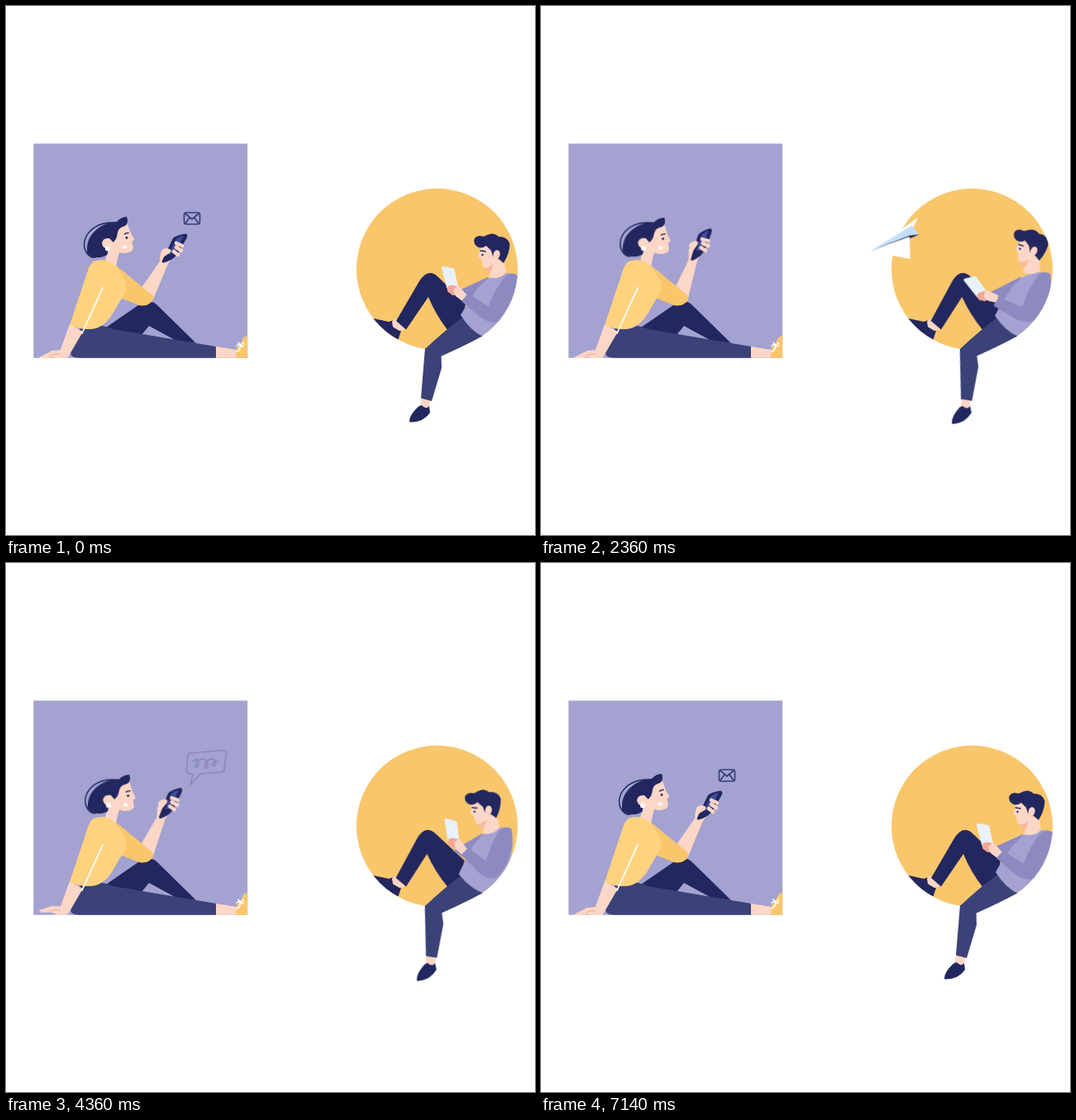
Recreate the animation shown at these times as an HTML page. Size 640 px wide and 640 px high, loop 7210 ms.

```html
<!DOCTYPE html>
<html lang="en">
<head>
<meta charset="utf-8">
<title>Paper plane messages</title>
<style>
  html, body { margin: 0; width: 100%; height: 100%; overflow: hidden; background: #fff; }
  svg { display: block; width: 100%; height: 100%; }

  .navy { fill: #23275f; }
  .denim { fill: #3a4277; }
  .skin { fill: #fcd6c6; }
  .lilac { fill: #a3a2d1; }
  .violet { fill: #8d8ac2; }
  .amber { fill: #f9c66c; }
  .lemon { fill: #ffd280; }
  .white { fill: #fff; }
  .line { fill: none; stroke: #23275f; stroke-width: 1.5; stroke-linecap: round; stroke-linejoin: round; }
  .icon { stroke: #3a3f7c; stroke-width: 1.7; }

  /* The woman and her messages use the full loop, the man and the plane repeat twice in it. */
  .slow { animation: 7.21s ease-in-out infinite; }
  .fast { animation: 3.605s ease-in-out infinite; }

  #w-head { transform-origin: 128px 308px; animation-name: w-head; }
  #w-arm { transform-origin: 170px 355px; animation-name: w-arm; }
  #w-thumb { transform-origin: 187px 300px; animation-name: w-thumb; }
  #w-hand { transform-origin: 70px 419px; animation-name: w-hand; }
  #mail { transform-origin: 225px 257px; animation-name: mail; }
  #bubble { transform-origin: 224px 267px; animation-name: bubble; }

  #m-torso { transform-origin: 572px 396px; animation-name: m-torso; }
  #m-head { transform-origin: 592px 318px; animation-name: m-head; }
  #m-arm { transform-origin: 585px 377px; animation-name: m-arm; }
  #m-hand { transform-origin: 541px 344px; animation-name: m-hand; }
  #m-knee { transform-origin: 480px 390px; animation-name: m-knee; }
  #m-shin { transform-origin: 515px 417px; animation-name: m-shin; }

  #plane {
    offset-path: path("M525 325 C480 325 440 318 405 298 C340 262 340 169.500 400 169.500 C500 167.500 510 245 430 281 C340 320 265 280 224 190");
    offset-rotate: auto;
    offset-anchor: 0 0;
    animation-name: fly;
    animation-timing-function: linear;
  }
  #plane-size { animation-name: plane-size; }

  @keyframes w-head {
    0%, 5% { transform: rotate(0deg); }
    16%, 61% { transform: rotate(3.6deg); }
    74%, 100% { transform: rotate(0deg); }
  }
  @keyframes w-arm {
    0%, 20% { transform: rotate(0deg); }
    30%, 57% { transform: rotate(-9deg); }
    64%, 100% { transform: rotate(0deg); }
  }
  @keyframes w-thumb {
    0%, 8% { transform: none; }
    14%, 78% { transform: translate(2px, -4px) rotate(-12deg); }
    90%, 100% { transform: none; }
  }
  @keyframes w-hand {
    0%, 6% { transform: rotate(0deg); }
    20% { transform: rotate(6deg); }
    32.7% { transform: rotate(0deg); }
    42.6%, 76% { transform: rotate(9deg); }
    98%, 100% { transform: rotate(0deg); }
  }
  @keyframes mail {
    0%, 7% { opacity: 1; transform: none; }
    11.5% { opacity: 0; transform: none; }
    91% { opacity: 0; transform: scale(0); }
    94.5% { opacity: 1; transform: scale(1.1); }
    97%, 100% { opacity: 1; transform: none; }
  }
  @keyframes bubble {
    0%, 44% { opacity: 0; transform: scale(0); }
    47% { opacity: 1; transform: scale(1.08); }
    49%, 57% { opacity: 1; transform: none; }
    62.3%, 100% { opacity: 0; transform: none; }
  }

  @keyframes m-torso {
    0%, 2% { transform: rotate(0deg); }
    20%, 28% { transform: rotate(-6deg); }
    39.7% { transform: rotate(-3.6deg); }
    51%, 67% { transform: rotate(-2.2deg); }
    92%, 100% { transform: rotate(0deg); }
  }
  @keyframes m-head {
    0%, 2% { transform: rotate(0deg); }
    20%, 28% { transform: rotate(1deg); }
    39.7% { transform: translate(0, -1px) rotate(-.5deg); }
    51%, 67% { transform: translate(3px, -4px) rotate(12deg); }
    85.2% { transform: rotate(1deg); }
    92%, 100% { transform: rotate(0deg); }
  }
  @keyframes m-arm {
    0%, 2% { transform: rotate(0deg); }
    20%, 28% { transform: rotate(11deg); }
    39.7% { transform: rotate(1.5deg); }
    51%, 67% { transform: rotate(-7.5deg); }
    85.2% { transform: rotate(-1deg); }
    92%, 100% { transform: rotate(0deg); }
  }
  @keyframes m-hand {
    0%, 2% { transform: rotate(0deg); }
    20%, 28% { transform: rotate(0deg); }
    39.7% { transform: rotate(-8deg); }
    51%, 67% { transform: rotate(-14deg); }
    85.2% { transform: rotate(-4deg); }
    92%, 100% { transform: rotate(0deg); }
  }
  @keyframes m-knee {
    0%, 2% { transform: skewX(0deg); }
    20%, 67% { transform: skewX(2.5deg); }
    88%, 100% { transform: skewX(0deg); }
  }
  @keyframes m-shin {
    0%, 2% { transform: rotate(0deg); }
    20%, 67% { transform: rotate(-6deg); }
    85.2% { transform: rotate(-1.2deg); }
    92%, 100% { transform: rotate(0deg); }
  }

  @keyframes fly {
    0%, 30.7% { offset-distance: 0%; }
    39.7% { offset-distance: 16.5%; }
    52.6% { offset-distance: 39.9%; }
    65.5% { offset-distance: 66.2%; }
    85.6%, 100% { offset-distance: 100%; }
  }
  @keyframes plane-size {
    0%, 30.7% { transform: scale(0); }
    39.7% { transform: scale(.75); }
    45%, 72% { transform: scale(1); }
    86.5%, 100% { transform: scale(0); }
  }
</style>
</head>
<body>
<svg viewBox="0 0 640 640">
  <defs>
    <clipPath id="in-square"><rect x="33.300" y="166.500" width="258.900" height="259.300"/></clipPath>
    <clipPath id="in-circle"><circle cx="521.500" cy="318.300" r="97.500"/></clipPath>
  </defs>

  <g id="woman" clip-path="url(#in-square)">
    <rect class="lilac" x="33" y="166" width="260" height="260"/>

    <path class="navy" d="M118 391 L160 362 Q172 353 182 361 L230 408 L206 405 L173 387 L164 398 L130 396Z"/>
    <path class="denim" d="M92 384 Q112 384 130 391 L254 412 V426 H88 Q74 425 80 414Z"/>
    <path class="skin" d="M254 412 L279 416 V426 H254Z"/>
    <path class="amber" d="M278 426 L279 413 Q284 411 286 403 Q288 399 293 399 V426Z"/>
    <path d="M279 418 Q284 417 283 411 M279 411 L283 409 M281 407 L285 412 M284 409 L287 412 M286 407 L288 409" fill="none" stroke="#fff" stroke-width="1.500" stroke-linecap="round"/>

    <g id="w-arm" class="slow">
      <path class="skin" d="M161 345 L186 309 L188 297 Q192 292 199 294 L203 302 L196 312 L178 355 Q168 360 161 345Z"/>
      <path class="navy" d="M189 308 L202 281 Q206 277 217 275.500 Q221 276 218.500 281 L207 301 Q199 309 191 310.500 Q188 311 189 308Z"/>
      <path d="M197 300 L206 282 Q209 279 215 278 L204 299Z" fill="#3d4da0"/>
      <path d="M206 287 L213 290 M206 292 L212 296 M203 297 L208 301" stroke="#fcd6c6" stroke-width="4.600" stroke-linecap="round"/>
      <path id="w-thumb" class="slow skin" d="M186 306 L188 296 Q191 292 198 294 Q201 296 198 299 L193 302Z"/>
    </g>
    <path class="amber" d="M131 312 L176 349 Q181 354 175 359 Q169 364 161 362 L138 353Z"/>

    <path class="skin" d="M77 385 L93 394 L75 425 L64 421Z"/>
    <g id="w-hand" class="slow">
      <path class="skin" d="M68 416 L56 417 L40 425 L44 427 L56 425 L64 427 L75 426Z"/>
      <path d="M53 424 L59 421 L66 421" fill="none" stroke="#efaa98" stroke-width="1"/>
    </g>

    <path class="skin" d="M124 290 L138 294 L133 314 Q127 320 120 309Z"/>
    <path class="lemon" d="M106 309 Q120 304 131 313 Q146 330 146 344 Q138 357 128 374 Q116 392 99 391 Q88 391 77 386 L99 320 Q101 313 106 309Z"/>
    <path d="M117 341 L92 396" stroke="#fff" stroke-width="1.800" stroke-linecap="round"/>

    <g id="w-head" class="slow">
      <path class="line" d="M134 262 C100 260 88 286 98 299 Q102 305 108 304"/>
      <path class="skin" d="M131 272 L147 264 L151 275 L155.500 282.500 L152.500 285 L154 293 Q153 299 141 299 L134 297 L124 292Z"/>
      <path class="navy" d="M98 296 Q97 277 116 266 Q126 261 133 262 Q139 255 146 255 Q149 262 144 266 Q136 268 135 274 Q134 283 130 286 L126 299 Q114 307 104 303 Q98 301 98 296Z"/>
      <path class="skin" d="M133 282 L141 290 L134 301 L122 303 L124 294 Q117 294 116 287 Q117 280 125 281 L130 286Z"/>
      <circle class="white" cx="123" cy="293.500" r="3"/>
      <circle class="navy" cx="146" cy="280.500" r="1.400"/>
      <path class="line" d="M143.500 276 Q145 274.500 148 274.500"/>
      <path class="white" d="M141 289 L147 291 Q145 295 142 293Z"/>
    </g>

    <g id="mail" class="slow">
      <path class="line icon" d="M218 250 H232 Q234.500 250 234.500 252.500 V261 Q234.500 264 232 264 H218 Q215.500 264 215.500 261 V252.500 Q215.500 250 218 250Z M217 251 L225 258 L233 251 M217 263 L222 256 M233 263 L228 256"/>
    </g>
    <g id="bubble" class="slow">
      <path class="line icon" d="M223 230 L264 226.500 Q267 226.500 266.500 230 L264 250 Q263.500 252.500 260 253 L235 255 L223.500 268 L226 255.500 L221 255 Q218 254 218.500 251 L220 233 Q220.500 230 223 230Z M226 240 C236 231 233 251 230 247 C226 237 244 233 244 244 C244 252 237 248 243 240 C250 233 256 240 253 245 C249 248 247 240 257 240"/>
    </g>
  </g>

  <g id="man">
    <circle class="amber" cx="521.500" cy="318.300" r="97.500"/>
    <g clip-path="url(#in-circle)">
      <path class="navy" d="M440 377 L463 382 L469 380 L469 389 L478 393 L473 408 L440 395Z"/>
      <path class="skin" d="M467 382 Q469 378 474 379 L483 391 L476 393 L468 388Z"/>
      <path id="m-knee" class="fast navy" d="M472 381 L500 333 Q511 316 523 328 L556 360 L552 384 L535 393 Q520 374 511 352 L484 391.500Z"/>
    </g>

    <g id="m-shin" class="fast">
      <path class="skin" d="M503 473 L514 475 L511 487 L500 486Z"/>
      <path class="navy" d="M488 502 Q488 495 499 484.500 L503 483 Q508 489 512 484 L513 492 Q505 503.500 490 503.500 Q488 504 488 502Z"/>
      <path class="denim" d="M507 414 L502 474.500 L515 478 L527 438 L526.500 420Z"/>
    </g>
    <path class="denim" d="M507 415 Q529 394 552 377 L577 399 Q555 411 527 423.500 L515 425Z"/>

    <g clip-path="url(#in-circle)">
      <g id="m-torso" class="fast">
        <path class="violet" d="M546 345 L583 328 L590 340 L562 358Z"/>
        <path class="lilac" d="M554 367 L571 341 L584 329 Q600 322 612 323.500 L619 326 Q623 376 577 400 Q562 393 550 374Z"/>
        <g id="m-head" class="fast">
          <path class="skin" d="M589 308 L602 306 L605 323 Q596 332 584 328 L588 317Z"/>
          <path d="M579 317 Q586 316 590 311 L588 318 L583 323Z" fill="#f6b7a6"/>
          <path class="skin" d="M574 291 L571.500 303.500 L575 306 L576.500 315 Q580 319 590 312 L597 303 L591 290Z"/>
          <path class="navy" d="M567 288 Q564 279 573 278 Q579 280 582 277 Q590 273 596 279 Q607 279 609.500 288 Q609 300 602 311 L596 306 L589 303 L587 296 L581 290 Q573 296 567 288Z"/>
          <ellipse class="skin" cx="593.500" cy="301" rx="4" ry="5.800" transform="rotate(15 593.500 301)"/>
          <path class="line" d="M574 296 L580 297"/>
          <circle class="navy" cx="576.500" cy="301" r="1.200"/>
        </g>
        <g id="m-arm" class="fast">
          <g id="m-hand" class="fast">
            <path d="M536 338 L549 339 L552 349 L540 350 L534 345Z" fill="#f2a795"/>
            <path d="M528.500 315 L540 317 Q542 317 542.500 319 L547 340 L533.500 342 L527 317 Q527 315 528.500 315Z" fill="#e9f2fc"/>
            <path d="M534 340 Q537 336 546 339 L546 345 L537 347 Q533 346 534 340Z" fill="#f2a795"/>
            <path class="skin" d="M541 345 Q542 340 548 339 L558 350 L552 357 L544 351Z"/>
          </g>
          <path class="violet" d="M551 357 L559 348 L584 364 L597 378 Q588 387 573 376Z"/>
        </g>
        <path class="violet" d="M584 363 Q592 342 604 327 Q612 321 619 326 Q621 355 601 378 Q592 387 581 380 L576 369Z"/>
      </g>
    </g>
  </g>

  <g id="plane" class="fast">
    <g id="plane-size" class="fast">
      <path class="white" d="M33 -2 L-8 -29.500 L-18 -4Z M33 -2 L-36 13 L-25 3Z"/>
      <path d="M33 -2 L-26 7 L-29 -6 L-18 -4Z" fill="#c5def5"/>
      <path class="navy" d="M33 -2 L-18 -3 L-30 -6.500 L-18 -6.500 L-17 -4Z"/>
    </g>
  </g>
</svg>
</body>
</html>
```
